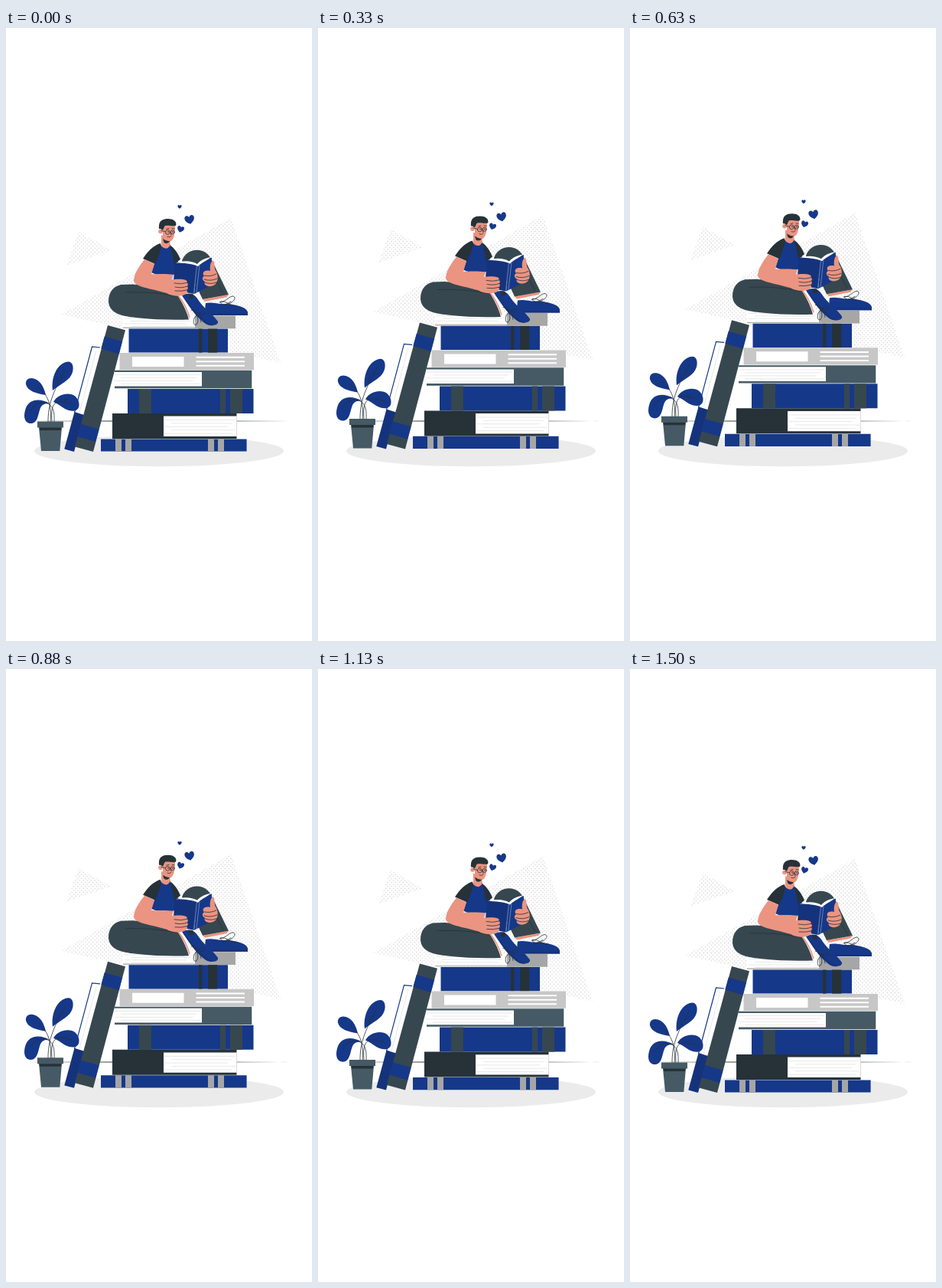
These frames come from a looping animation (400x800 px, 1.54 s). An HTML page:

```html
<!DOCTYPE html>
<html lang="en">
<head>
<meta charset="utf-8">
<title>Reading on a stack of books</title>
<style>
  html, body { margin: 0; height: 100%; overflow: hidden; background: #fff; }
  svg { display: block; width: 100%; height: 100%; }
  .blue { fill: #163889; }
  .navy { fill: #15337c; }
  .ink { fill: #263238; }
  .slate { fill: #37474f; }
  .steel { fill: #455a64; }
  .grey { fill: #a6a6a6; }
  .pale { fill: #c7c7c7; }
  .white { fill: #fff; }
  .skin { fill: #eb9481; }
  .line { fill: none; stroke: #263238; stroke-width: .8; stroke-linecap: round; stroke-linejoin: round; }
  .rule { fill: none; stroke: #dedede; stroke-width: .7; }
</style>
</head>
<body>
<svg viewBox="0 0 400 800">
  <defs>
    <pattern id="dots" width="5" height="5.2" patternUnits="userSpaceOnUse" fill="#dcdcdc">
      <circle cx="1.25" cy="1.3" r=".95"/>
      <circle cx="3.75" cy="3.9" r=".95"/>
    </pattern>
    <path id="heart" class="blue" d="M0 5C-3 3-5.5 1-5.2-2C-5-5-1.4-5.6 0-2.6C1.4-5.6 5-5 5.2-2C5.5 1 3 3 0 5Z"/>
  </defs>

  <ellipse cx="200" cy="552" rx="163" ry="20.2" fill="#ebebeb"/>
  <path class="ink" d="M28 513L200 512.3L373 513L200 513.7Z"/>

  <g id="floating">
    <g fill="url(#dots)">
      <path d="M294 248L359 437L72 374Z"/>
      <path d="M95 266L137 290L79 310Z"/>
    </g>

    <g id="books"></g>

    <!-- leaning book -->
    <path class="white" d="M112 416L125 419L102 506L89 502Z"/>
    <path class="rule" d="M118 421L96 502"/>
    <path d="M123 417L112.500 416L89.500 502" fill="none" stroke="#163889" stroke-width="1.200"/>
    <path class="navy" d="M89.500 501L102 505L89 553L76.300 549.600Z"/>
    <path class="slate" d="M133 388L156 394.300L114 553L90 546.500Z"/>
    <path class="blue" d="M128.700 402.500L152 409L147.700 425.500L124.300 418.500Z"/>
    <path class="blue" d="M98 517L121.500 523.500L117 540L93.500 533Z"/>

    <!-- plant -->
    <g class="blue">
      <path d="M61 473C59 456 66 440 78 436C87 433 89 442 87 449C84 460 72 464 61 473Z"/>
      <path d="M52 479C40 477 28 474 26 465C25 457 33 455 40 459C47 463 50 471 52 479Z"/>
      <path d="M62 488C66 480 77 476 85 478C94 480 97 490 95 495C92 502 83 500 77 497C71 493 67 490 62 488Z"/>
      <path d="M57 490C45 483 29 483 25 499C22 510 26 517 34 516C43 514 42 500 46 494C49 490 53 490 57 490Z"/>
    </g>
    <g class="line">
      <path d="M58 514C60 497 57 480 42 468M55 514C55 492 60 478 77 447M63 514C64 497 60 488 45 489Q36 491 32 500M60 514C59 497 60 488 72 487L86 490"/>
      <path d="M66 465L67 457M71 457L78 455M42 489L37 488M75 488L80 484" stroke-width=".5"/>
    </g>
    <path class="steel" d="M43 521H73L70.300 552H46Z"/>
    <path class="ink" d="M43.400 521H72.600L72 525H44Z"/>
    <path class="steel" d="M41 513.500H75V521.500H41Z"/>

    <!-- raised leg and shoe -->
    <path class="skin" d="M257 354L291 348L288 351.500L260 357Z"/>
    <path class="slate" d="M230 304C235 287 259 284 268 301L291 348L257 354L248 335Z"/>
    <path class="line" d="M272 325L284 346"/>
    <path class="blue" d="M261 359C270 357 278 361 288 360C300 361 315 364 316 371V375H262C260 370 260 364 261 359Z"/>
    <path class="navy" d="M261 372.500H316V375H262Z"/>
    <path class="line" d="M280 358C290 356 291 350 297 350C302 352 297 358 291 360C285 363 279 359 280 357Q286 356 291 360L300 363M283 363L294 357"/>

    <!-- folded leg and shoe -->
    <path class="white" d="M222 346L231 348L244 380H238Z"/>
    <path class="slate" d="M150 335C138 338 134 347 134 357C135 372 150 376 170 378C195 381 220 381 239 380.500C236 368 229 356 223 347C200 343 185 335 165 334.500Z"/>
    <path class="line" d="M156 345C180 344 203 346 222 350"/>
    <path d="M225 349Q235 361 240 378" fill="none" stroke="#eb9481" stroke-width="1.600"/>
    <path class="blue" d="M230 349C240 344 247 347 252 356C258 365 270 373 277 383C278 388 270 389 264 387C252 380 239 362 230 349Z"/>
    <path class="navy" d="M230 349C242 362 252 377 265 385L271 388C265 389 260 386 256 382C246 374 238 361 230 349Z"/>
    <path class="line" d="M242 368C250 369 253 376 258 374Q263 371 257 370Q249 373 246 379C244 385 246 389 249 387C253 382 250 376 247 371M254 378L255 384"/>

    <!-- torso -->
    <path class="skin" d="M203 270V284C206 291 213 290 215 284L214 276Z"/>
    <path class="blue" d="M202 283C199 291 195 305 190 319C196 323 215 325 224 320L225 297L214 284C212 289 206 289 202 283Z"/>
    <path class="ink" d="M202 281C192 284 185 292 179 301L195 308C199 300 201 292 203 286Z"/>
    <path class="ink" d="M214 283C220 287 225 294 228 302L220 308C218 298 217 291 214 283Z"/>

    <!-- head -->
    <path class="skin" d="M205 260V273C206 278 212 280 216 278C220 275 221 266 221 257L206 255Z"/>
    <circle class="skin" cx="202" cy="265.500" r="2.800"/>
    <path class="ink" d="M200 262C199 253 203 249 212 249C219 249 224 253 222 258C217 259 212 257 208 258C206 260 206 264 204 264C203 262 202 262 200 262Z"/>
    <path class="ink" d="M205 275Q210 279 214.500 278Q211 283 206.500 280Z"/>
    <g class="line" stroke-width=".7">
      <circle cx="211.400" cy="266.500" r="2.900"/>
      <circle cx="217.700" cy="266.300" r="2.500"/>
      <path d="M208.500 266L203 264.500M210 262.300L213 261.500M217 261.500L220 262M215 267L216 270M211 272.500Q214 274 216 271.500"/>
    </g>
    <g class="ink">
      <circle cx="212" cy="266" r=".8"/>
      <circle cx="217.700" cy="266" r=".8"/>
    </g>

    <!-- open book -->
    <path class="navy" d="M221 305L250 309L246 347L218 342Z"/>
    <path class="blue" d="M250 309L269 299.500L266 337L246 347Z"/>
    <path class="white" d="M222 306.500C232 303 243 304 250 308C255 302 262 300 268 299C262 304 256 306 251 311C243 307 232 307 222 306.500Z"/>
    <path d="M249.500 310L245.500 346M253 309L249 345" fill="none" stroke="#8b9cc7" stroke-width=".7"/>
    <circle class="ink" cx="242" cy="350" r="3.200"/>

    <!-- arms and hands -->
    <path class="skin" d="M181 302C173 312 167 322 167 330C168 338 190 340 210 346C218 351 232 351 236 346Q238 344 236 342Q239 340 237 337Q239 334 236.500 332.500C239 326 222 328 217 328L219 322C205 320 195 322 190 321L194 308Z"/>
    <path class="line" d="M220 333Q229 335 236.500 332.500M221 338Q230 340 237 337M221 343Q230 344 236 342"/>
    <path class="skin" d="M267 317C266 310 268 303 271 304C274 306 271 314 275 318C279 327 276 336 268 337C262 338 258 334 260 331C256 329 256 325 259 324C256 320 258 315 267 317Z"/>
    <path class="line" d="M259 323Q267 325 275 321M259 328Q267 331 276 327M260 332Q268 335 275 332"/>

    <use href="#heart" transform="translate(227 233.300) scale(.5)"/>
    <use href="#heart" transform="translate(240 250) rotate(-12) scale(1.200)"/>
    <use href="#heart" transform="translate(228.200 262.500) rotate(16) scale(.86)"/>
  </g>
</svg>
<script>
const books = document.getElementById('books');
const floating = document.getElementById('floating');

const add = (cls, d) => books.insertAdjacentHTML('beforeend', `<path class="${cls}" d="${d}"/>`);
const box = (cls, left, top, right, bottom) => add(cls, `M${left} ${top}H${right}V${bottom}H${left}Z`);
const bands = (cls, top, bottom, ...spans) => spans.forEach(([l, r]) => box(cls, l, top, r, bottom));
const rules = (left, right, first, gap, count) => {
  for (let i = 0; i < count; i++) add('rule', `M${left + i % 2 * 8} ${first + i * gap}H${right - i % 3 * 5}`);
};

// Stack, from the floor up
box('blue', 124, 536.4, 314.6, 552.6);
bands('grey', 536.4, 552.6, [143, 151], [156, 164], [264, 272], [277, 285]);

box('ink', 139, 503, 301.5, 536);
box('white', 206, 506.6, 301.5, 533);
rules(208, 300, 511.5, 4.4, 5);
add('rule', 'M301.500 506V533');

box('blue', 159, 471, 323.5, 503);
bands('slate', 471, 503, [174, 190], [280, 287], [293, 309]);

box('steel', 142, 446.8, 321.3, 470.2);
box('white', 141, 449, 256, 467.6);
rules(142, 254, 452.5, 4, 4);

box('pale', 148.5, 424, 324, 446.2);
box('white', 165, 429, 232.5, 442);
bands('white', 428.7, 430.7, [248.5, 312]);
bands('white', 434.2, 436.2, [248.5, 312]);
bands('white', 439.7, 441.7, [248.5, 312]);

box('blue', 160.5, 392.4, 290, 423.6);
bands('ink', 392.4, 423.6, [252, 256.5], [264, 276.2]);

box('white', 153, 376, 247, 391);
rules(155, 246, 379, 3.5, 4);
box('grey', 247, 375.5, 300, 392.2);
box('grey', 153, 390.6, 247, 391.8);

// Linear bob, stepped at 24 frames per second
const LOOP = 1540, STEP = 1000 / 24, PERIOD = 36, HEIGHT = 8, PHASE = 0.6;

function draw(now) {
  const step = Math.min(36, Math.floor((now % LOOP + 4) / STEP));
  const p = (step + PHASE) % PERIOD / PERIOD;
  const lift = HEIGHT * (1 - Math.abs(2 * p - 1));
  floating.setAttribute('transform', `translate(0 ${0.27 - lift})`);
  requestAnimationFrame(draw);
}
draw(0);
</script>
</body>
</html>
```
